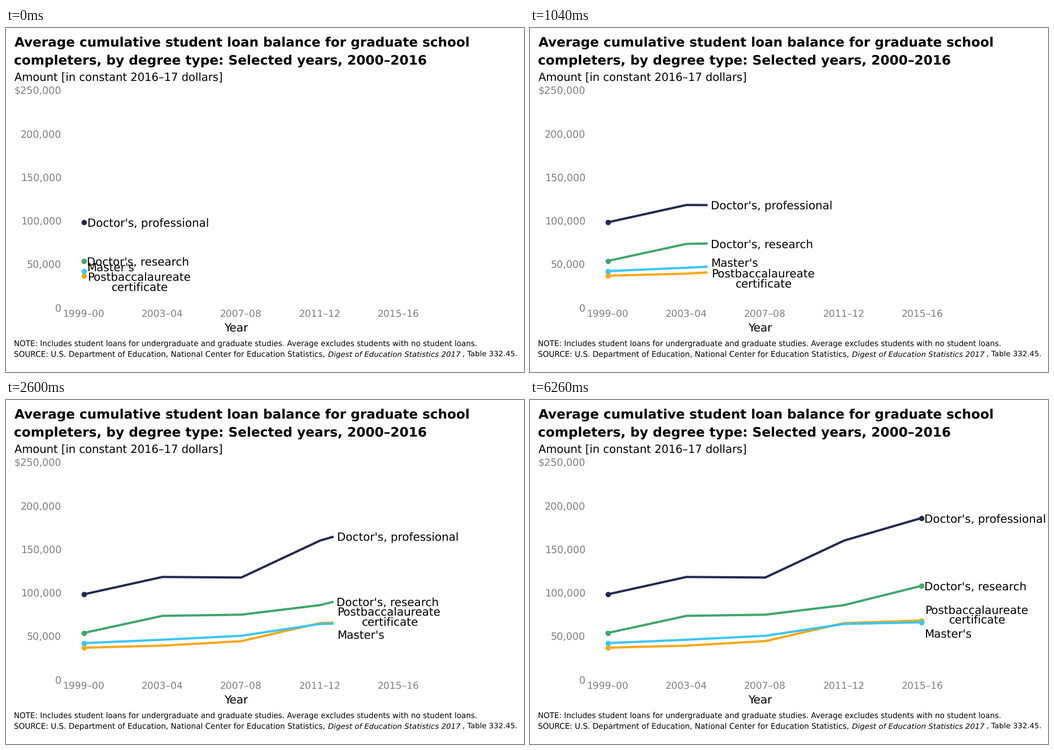
A matplotlib script for the animation above (6.28 s loop, 917 px wide and 611 px high).

```python
import numpy as np
import matplotlib.pyplot as plt
from matplotlib.animation import FuncAnimation

W, H, DPI = 917, 611, 64
PT = 72 / DPI                     # points per pixel
FRAMES, STEP = 314, 20
KEYS = [0, 41, 82, 123, 163]      # frames at which the tips reach each year
XS = [137.5, 277, 416.5, 556, 692.5]
LAST = KEYS[-1]
SWAP = 103                        # the two lowest labels trade places
LABEL = 19.9

plt.rcParams["font.family"] = "DejaVu Sans"
plt.rcParams["text.hinting"] = "none"
fig = plt.figure(figsize=(W / DPI, H / DPI), dpi=DPI, facecolor="white")
ax = fig.add_axes([0, 0, 1, 1])
ax.set_xlim(0, W)
ax.set_ylim(H, 0)
ax.axis("off")


def base(y, size):
    """Baseline that centres capitals of the given size on y."""
    return y + 0.365 * size


def put(x, y, s, size, color="black", **kw):
    return ax.text(x, base(y, size), s, fontsize=size * PT, color=color,
                   va="baseline", zorder=5, **kw)


# Headings
put(15, 24.8, "Average cumulative student loan balance for graduate school",
    23.1, weight="bold")
put(14, 56.3, "completers, by degree type: Selected years, 2000–2016",
    23.25, weight="bold")
put(14.7, 86.5, "Amount [in constant 2016–17 dollars]", 19.55)

# Axes
GREY = "#808080"
for i in range(6):
    name = f"{'$' if i == 5 else ''}{i * 50000:,}"
    put(98, 497 - 77.2 * i, name, 17.5, GREY, ha="right")
for i, name in enumerate(["1999–00", "2003–04", "2007–08", "2011–12", "2015–16"]):
    put(137 + 139.5 * i, 507, name, 17.1, GREY, ha="center")
put(407.5, 531.5, "Year", 20, ha="center")

# Notes
put(13.7, 560, "NOTE: Includes student loans for undergraduate and graduate "
    "studies. Average excludes students with no student loans.", 13.53)
put(14.2, 579, "SOURCE: U.S. Department of Education, National Center for "
    "Education Statistics,", 13.58)
put(570.5, 579, "Digest of Education Statistics 2017", 13.4, style="italic")
put(808.5, 579, ", Table 332.45.", 13.3)


class Series:
    """A growing line whose labels follow its tip.

    Each label is (text, dx, dy before the swap, dy after it, alignment).
    """

    def __init__(self, color, ys, labels):
        self.ys = ys
        self.line, = ax.plot([], [], color=color, lw=4 * PT,
                             solid_capstyle="butt", solid_joinstyle="round")
        self.dots, = ax.plot([], [], "o", color=color, ms=9.6 * PT, mew=0,
                             snap=False)
        self.labels = [(put(0, 0, s, LABEL, ha=ha), dx, dy)
                       for s, dx, *dy, ha in labels]

    def update(self, k):
        t = min(k, LAST)
        tip_x, tip_y = np.interp(t, KEYS, XS), np.interp(t, KEYS, self.ys)
        n = sum(key < t for key in KEYS)
        self.line.set_data(XS[:n] + [tip_x], self.ys[:n] + [tip_y])
        ends = [0, -1] if k > LAST else [0]
        self.dots.set_data([XS[i] for i in ends], [self.ys[i] for i in ends])
        for text, dx, dy in self.labels:
            y = tip_y + dy[k >= SWAP]
            text.set_position((tip_x + dx, base(y, LABEL)))


series = [
    Series("#faa71b", [440, 436.3, 428.3, 396.2, 391.8],
           [("Postbaccalaureate", 6.3, 1, -19.5, "left"),
            ("certificate", 100, 19, -2, "center")]),
    Series("#3dc5f3", [431.8, 425.8, 418.8, 397.8, 394.8],
           [("Master's", 5.8, -7.3, 19.5, "left")]),
    Series("#40a66c", [413.8, 383.4, 381.3, 364.3, 330.3],
           [("Doctor's, research", 5.3, 0.3, 0.3, "left")]),
    Series("#242852", [345.2, 314.3, 315.3, 249.7, 209.8],
           [("Doctor's, professional", 6, 0.3, 0.3, "left")]),
]


def draw(k):
    for s in series:
        s.update(k)
    return []


anim = FuncAnimation(fig, draw, frames=FRAMES, interval=STEP,
                     repeat=True, repeat_delay=0, blit=False)
plt.show()
```
